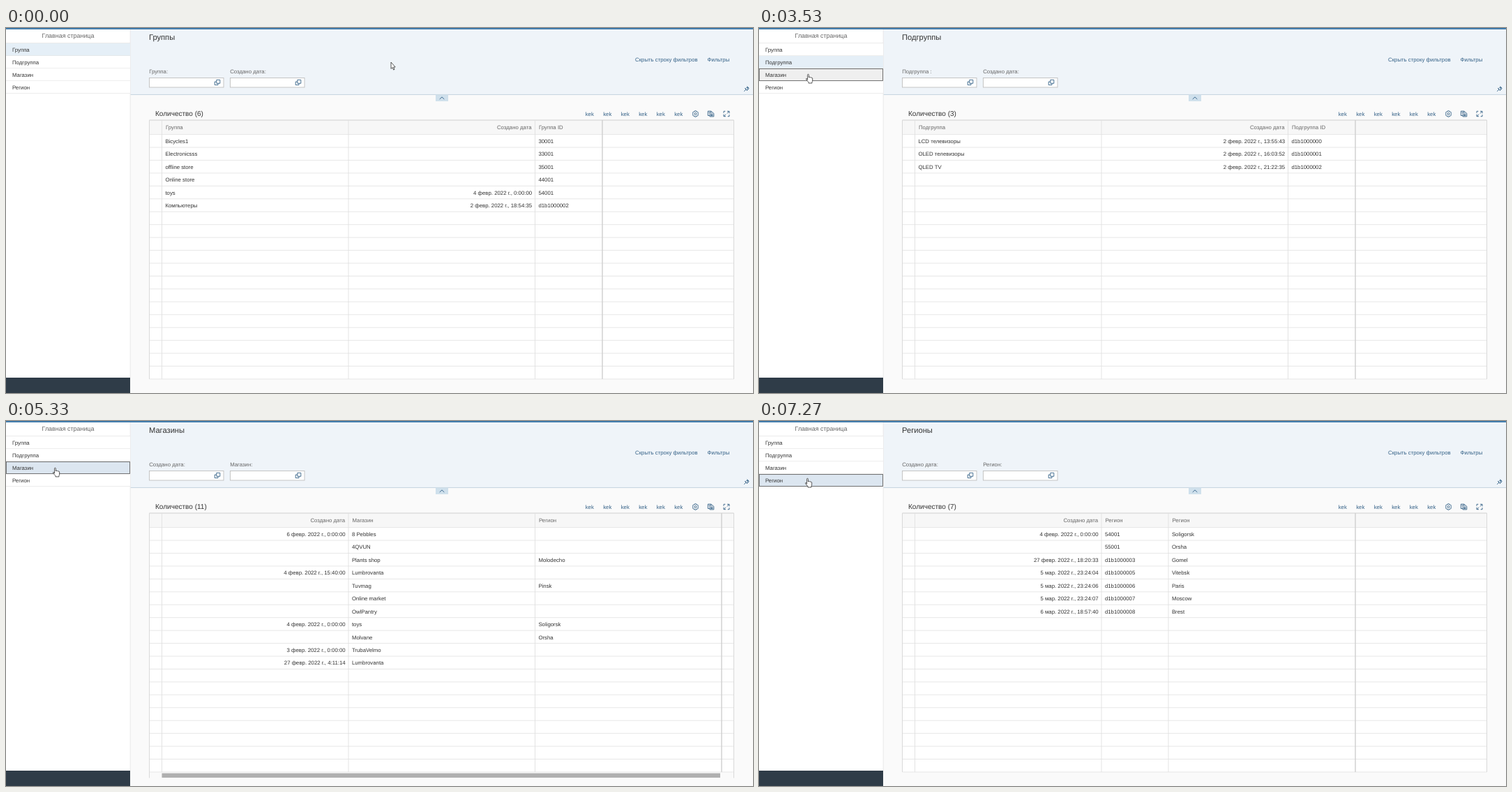
Recreate the animation shown at these times as an HTML page. Size 1071x523 px, loop 8000 ms.

```html
<!DOCTYPE html>
<html lang="ru">
<head>
<meta charset="utf-8">
<title>Справочники</title>
<style>
html, body { margin: 0; width: 100%; height: 100%; overflow: hidden; background: #fafafa; }
svg { display: block; width: 100%; height: 100%; }
text { font: 7.81px "Liberation Sans", Arial, sans-serif; fill: #333; text-rendering: geometricPrecision; white-space: pre; }
.label { fill: #666; }
.link { fill: #346187; }
.home { font-size: 8.93px; fill: #666; }
.title { font-size: 11.16px; }
.count { font-size: 10.04px; }
.status { font: 6.25px "Open Sans", "Noto Sans", sans-serif; fill: #fff; }
.icon { fill: none; stroke: #346187; stroke-width: .9; }
</style>
</head>
<body>
<svg id="stage" viewBox="0 0 1071 523" preserveAspectRatio="none"></svg>
<script>
const LOOP = 8000, TICK = 1000 / 15;
const ROW = 18.44, ROWS = 19, TOP = 132, BODY = 152.6, LEFT = 205.5, RIGHT = 1043.5;
const SHIFT = -51.4;
const menu = ['Группа', 'Подгруппа', 'Магазин', 'Регион'];
const feb = (day, time) => `${day} февр. 2022 г., ${time}`;
const mar = (day, time) => `${day} мар. 2022 г., ${time}`;

const pages = [
  { title: 'Группы', filters: ['Группа:', 'Создано дата:'],
    edges: [223.5, 491, 758.5, 855], dateCol: 1,
    heads: ['Группа', 'Создано дата', 'Группа ID'],
    rows: [['Bicycles1', '', '30001'], ['Electronicsss', '', '33001'],
      ['offline store', '', '35001'], ['Online store', '', '44001'],
      ['toys', feb(4, '0:00:00'), '54001'],
      ['Компьютеры', feb(2, '18:54:35'), 'd1b1000002']] },
  { title: 'Подгруппы', filters: ['Подгруппа :', 'Создано дата:'],
    edges: [223.5, 491, 758.5, 855], dateCol: 1,
    heads: ['Подгруппа', 'Создано дата', 'Подгруппа ID'],
    rows: [['LCD телевизоры', feb(2, '13:55:43'), 'd1b1000000'],
      ['OLED телевизоры', feb(2, '16:03:52'), 'd1b1000001'],
      ['QLED TV', feb(2, '21:22:35'), 'd1b1000002']] },
  { title: 'Магазины', filters: ['Создано дата:', 'Магазин:'],
    edges: [223.5, 491, 758.5, 1026], dateCol: 0, scroll: true,
    heads: ['Создано дата', 'Магазин', 'Регион'],
    rows: [[feb(6, '0:00:00'), '8 Pebbles', ''], ['', '4QVUN', ''],
      ['', 'Plants shop', 'Molodecho'], [feb(4, '15:40:00'), 'Lumbrovanta', ''],
      ['', 'Tuvmag', 'Pinsk'], ['', 'Online market', ''], ['', 'OwlPantry', ''],
      [feb(4, '0:00:00'), 'toys', 'Soligorsk'], ['', 'Molvane', 'Orsha'],
      [feb(3, '0:00:00'), 'TrubaVelmo', ''], [feb(27, '4:11:14'), 'Lumbrovanta', '']] },
  { title: 'Регионы', filters: ['Создано дата:', 'Регион:'],
    edges: [223.5, 491, 587, 855], dateCol: 0,
    heads: ['Создано дата', 'Регион', 'Регион'],
    rows: [[feb(4, '0:00:00'), '54001', 'Soligorsk'], ['', '55001', 'Orsha'],
      [feb(27, '18:20:33'), 'd1b1000003', 'Gomel'],
      [mar(5, '23:24:04'), 'd1b1000005', 'Vitebsk'],
      [mar(5, '23:24:06'), 'd1b1000006', 'Paris'],
      [mar(5, '23:24:07'), 'd1b1000007', 'Moscow'],
      [mar(6, '18:57:40'), 'd1b1000008', 'Brest']] }
];

// Page visits, in ticks: hover, click, filters open, status fade, busy, data ready
const visits = [
  { page: 1, hover: 19, click: 20, open: 21, fade: 25, busy: 29, done: 31 },
  { page: 2, hover: 53, click: 55, open: 57, fade: 58, busy: 59, done: 66 },
  { page: 3, hover: 92, click: 94, open: 94, fade: 98, busy: 102, done: 109 }
];
// Pointer moves of seven ticks each
const moves = [
  { start: 0, from: [552, 49], to: [83, 47] },
  { start: 43, from: [79.5, 47], to: [67, 66] },
  { start: 79, from: [67, 66], to: [66, 82] }
];

const clamp = x => Math.max(0, Math.min(1, x));
const smooth = x => x * x * (3 - 2 * x);
const rect = (x, y, w, h, fill, more = '') => `<rect x="${x}" y="${y}" width="${w}" height="${h}" fill="${fill}" ${more}/>`;
const line = (x1, y1, x2, y2, color, w = 1) => `<path d="M${x1} ${y1}L${x2} ${y2}" stroke="${color}" stroke-width="${w}"/>`;
const text = (x, y, s, cls = '', anchor = 'start') => `<text x="${x}" y="${y}" class="${cls}" text-anchor="${anchor}">${s}</text>`;
const group = (x, y, body, more = '') => `<g transform="translate(${x} ${y})" ${more}>${body}</g>`;
const icon = (x, y, d, more = '') => group(x, y, `<path class="icon" d="${d}"/>`, more);

const ICONS = {
  help: 'M-1.2-3.7h5v5h-5zM-1.2-1h-2.6v4.6h4.8V1.3',
  gear: 'M-1.5 0a1.5 1.5 0 1 0 3 0a1.5 1.5 0 1 0-3 0M-1-4.2h2l.4 1.2 1.2-.4 1.3 1.4-.6 1.1 1 .9-1 .9.6 1.1-1.3 1.4-1.2-.4-.4 1.2h-2l-.4-1.2-1.2.4-1.3-1.4.6-1.1-1-.9 1-.9-.6-1.1 1.3-1.4 1.2.4z',
  sheet: 'M-1.5 2.5h-2.6v-6.4h4.8v1.2M-1.5-2.3h4l1.8 1.7v4.5h-5.8zM-.4 0h3.4M-.4 1.3h3.4M-.4 2.6h3.4M-3-2.3h1',
  full: 'M1-3.7h3v3M4-3.7.8-.6M-1 3.7h-3v-3M-4 3.7-.8.6M-4-1.2v-2.5h2.3M4 1.2v2.5H1.7',
  pin: 'M-3.8 3.8-1 1M-2.8-.8 .9 2.9M-1.7-.2 1-2.2 2.2 1 .2 1.7M.6-3.4 3.5-.5M1-2.2 2.2 1',
  up: 'M-3.3 1.6 0-1.5 3.3 1.6'
};
const ARROW = '<path d="M0 0V9.4L2.1 7.5 3.6 11 5 10.4 3.6 7H6.2Z" fill="#fff" stroke="#222" stroke-width=".75"/>';
const HAND = '<path d="M2.6 8.2V1.3q0-1 .9-1t.9 1V5q.2-.8 1-.7t.9.8q.3-.6 1-.4t.8.8q.3-.4.9-.2t.7.9v3q0 1.4-.7 2.2v1.6H4v-1.4Q2.6 10.3.6 7.5.2 6.7.9 6.4t1.7 1.8Z" fill="#fff" stroke="#222" stroke-width=".75"/>';

function stateAt(n) {
  const s = { sel: 0, hover: -1, data: 0, open: true, empty: false, status: 0, busy: -1 };
  for (const v of visits) {
    if (n >= v.hover) s.hover = v.page;
    if (n < v.click) continue;
    s.sel = v.page;
    s.open = n >= v.open;
    if (s.open) s.data = v.page;
    s.empty = s.open && n < v.done;
    s.status = n < v.fade ? 1 : Math.max(0, [.8, .55, .3, .04][n - v.fade] || 0);
    s.busy = n >= v.busy && n < v.done ? (n - v.busy) * TICK : -1;
  }
  return s;
}

function sidebar(s) {
  let out = rect(0, 2, 178, 499, '#fff') + rect(0, 501, 178, 22, '#2f3c48');
  out += line(178.2, 2, 178.2, 501, '#e5e5e5', .8);
  out += text(89, 14.2, 'Главная страница', 'home', 'middle') + line(0, 21.7, 178, 21.7, '#e0e0e0', .8);
  menu.forEach((name, i) => {
    const y = 22 + 18 * i, over = i === s.hover;
    const fill = i === s.sel ? (over ? '#dce6f0' : '#e5eff7') : over ? '#efefef' : '#fff';
    out += rect(0, y, 178, 18, fill) + line(0, y + 17.7, 178, y + 17.7, '#e5e5e5', .8);
    out += text(9, y + 11.9, name);
  });
  if (s.hover >= 0) {
    out += rect(.5, 22.5 + 18 * s.hover - 4, 177, 17, 'none', 'stroke="#666" stroke-width=".9" transform="translate(0 4)"');
  }
  return out;
}

function header(s) {
  const page = pages[s.sel], end = s.open ? 95.4 : 44;
  let out = rect(178.5, 2, 892.5, end - 2, '#eff4f9') + line(178.5, end, 1071, end, '#c3d3df');
  out += text(205, 17, page.title, 'title');
  if (s.open) {
    out += text(902, 47.5, 'Скрыть строку фильтров', 'link') + text(1005.5, 47.5, 'Фильтры', 'link');
    page.filters.forEach((name, i) => {
      const x = 205.5 + 116 * i;
      out += text(x - .3, 65.2, name, 'label');
      out += rect(x, 71.5, 106.5, 13.5, '#fff', 'stroke="#bfbfbf" stroke-width=".9"');
      out += icon(x + 97.5, 78, ICONS.help);
    });
  }
  out += icon(1062, end - 8.4, ICONS.pin);
  out += rect(616, end + .3, 18, 9.2, '#cfe0ec') + icon(625, end + 5, ICONS.up);
  return out;
}

function table(s) {
  const p = pages[s.data], rows = s.empty ? [] : p.rows, bottom = BODY + ROW * ROWS;
  let out = text(214, 126, `Количество (${rows.length})`, 'count');
  for (let i = 0; i < 6; i++) out += text(830.7 + 25.5 * i, 125.7, 'kek', 'link');
  out += icon(988.5, 123, ICONS.gear);
  out += icon(1010.5, 123, ICONS.sheet, rows.length ? '' : 'opacity=".45"');
  out += icon(1033, 123, ICONS.full);

  out += rect(LEFT, TOP, RIGHT - LEFT, bottom - TOP, '#fff');
  out += rect(LEFT, TOP, RIGHT - LEFT, BODY - TOP, '#f7f7f7');
  for (let i = 0; i <= ROWS; i++) out += line(LEFT, BODY + ROW * i, RIGHT, BODY + ROW * i, '#e5e5e5', .9);
  out += line(LEFT, TOP, RIGHT, TOP, '#cfcfcf');
  const floor = p.scroll ? 511.5 : bottom;
  p.edges.forEach((x, i) => {
    out += line(x, TOP, x, bottom, i === 3 ? '#cfcfcf' : '#e0e0e0', i === 3 ? 1.4 : .9);
  });
  out += line(LEFT, TOP, LEFT, floor, '#d9d9d9') + line(RIGHT, TOP, RIGHT, floor, '#d9d9d9');

  const cell = (col, y, str, dx, cls) => !str ? '' : col === p.dateCol
    ? text(p.edges[col + 1] - 4.7 + (cls ? -.3 : .3), y, str, cls, 'end')
    : text(p.edges[col] + dx, y, str, cls);
  p.heads.forEach((h, c) => out += cell(c, 144.5, h, 5.5, 'label'));
  rows.forEach((r, i) => r.forEach((v, c) => out += cell(c, 165 + ROW * i, v, 4.9, '')));

  if (p.scroll) out += rect(223.5, 504.7, 800.5, 6.4, '#b0b0b0');
  if (s.busy >= 0) {
    out += rect(LEFT - .5, TOP + .5, RIGHT - LEFT + 1, 380, '#fafafa', 'opacity=".7"');
    for (let i = 0; i < 3; i++) {
      const pulse = Math.sin(Math.PI * clamp((s.busy - 100 * i) / 400));
      out += `<circle cx="${615.6 + 9 * i}" cy="322.7" r="${1.8 + 1.4 * pulse}" fill="#1f9ef0"/>`;
    }
  }
  return group(0, s.open ? 0 : SHIFT, out);
}

function status(s) {
  if (!s.status) return '';
  const bar = '<path d="M0 523V511.5H354.5q1.5 0 1.5 1.5V523Z" fill="#29333a"/>';
  return `<g opacity="${s.status}">${bar}${text(2.8, 519.8, 'Ожидание localhost...', 'status')}</g>`;
}

function pointer(n) {
  const m = moves.filter(v => n >= v.start).pop();
  const k = smooth(clamp((n - m.start) / 7));
  const [x, y] = m.from.map((a, i) => a + (m.to[i] - a) * k);
  if (n < visits[0].hover) return group(x, y, ARROW);
  return group(m === moves[0] ? moves[1].from[0] : x, y, HAND);
}

const stage = document.getElementById('stage');
let shown = -1;

function draw(time) {
  const n = Math.floor((time % LOOP + 4) / TICK) % 120;
  if (n === shown) return;
  shown = n;
  const s = stateAt(n);
  stage.innerHTML = rect(0, 0, 1071, 523, '#fafafa') + header(s) + table(s) + sidebar(s) +
    rect(0, 0, 1071, 2, '#427cac') + status(s) + pointer(n);
}

const began = performance.now();
function loop() {
  draw(performance.now() - began);
  requestAnimationFrame(loop);
}
loop();
</script>
</body>
</html>
```
